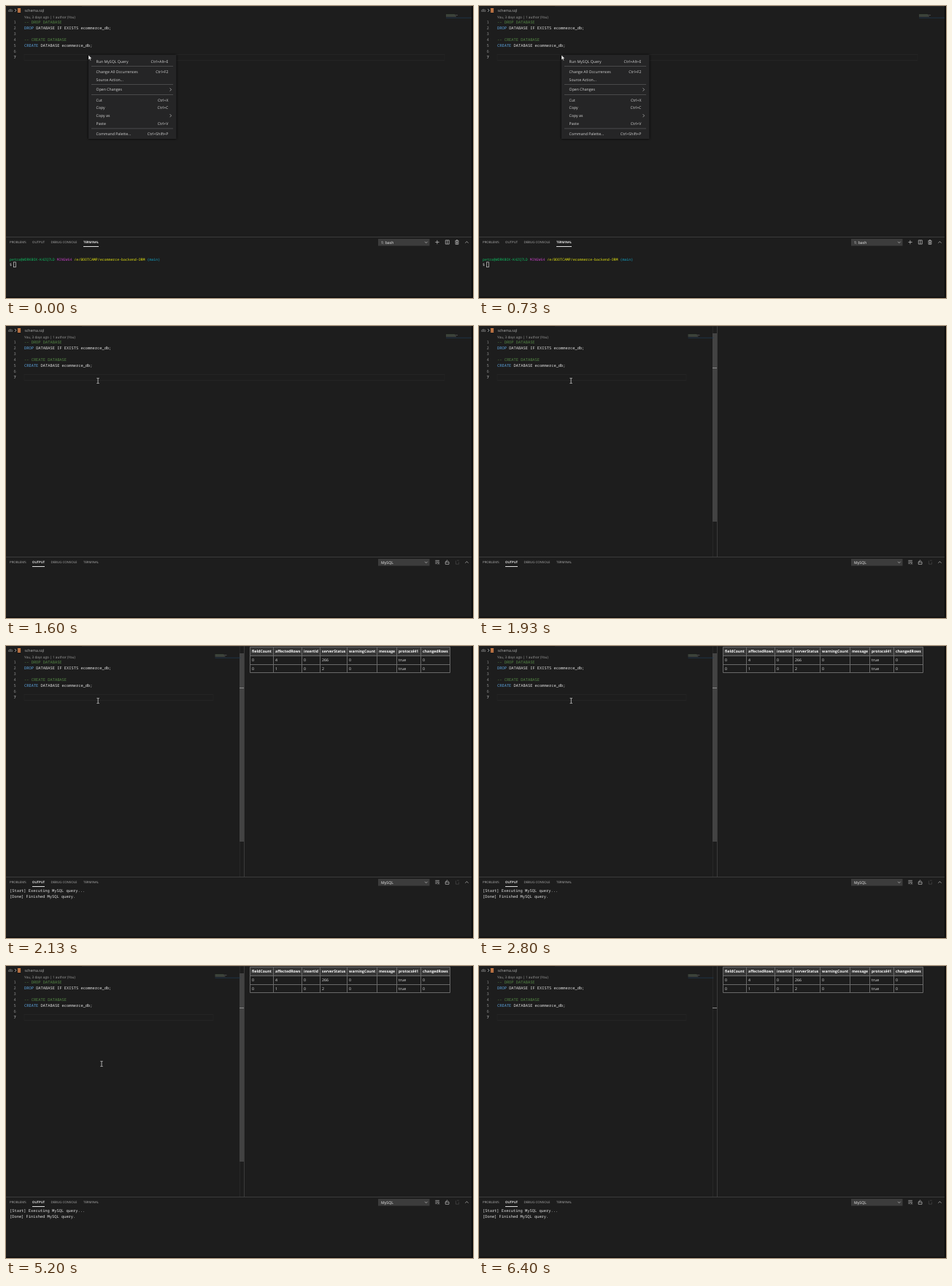
Animation, 640 px wide and 400 px high, one loop 6.86 s. Source, as an HTML page:

```html
<!DOCTYPE html>
<html lang="en">
<head>
<meta charset="utf-8">
<title>Running a schema query</title>
<style>
  html, body { margin: 0; width: 100%; height: 100%; overflow: hidden; background: #1d1d1d; }
  svg { display: block; width: 100%; height: 100%; }
  text { font: 5.2px "Open Sans", "Noto Sans", sans-serif; fill: #d6d6d6; white-space: pre; text-rendering: geometricPrecision; }
  .code { font: 500 5.38px "Noto Sans Mono", "DejaVu Sans Mono", monospace; fill: #e2e2e2; }
  .term { font-size: 4.91px; }
  .tab { font-size: 4.38px; fill: #aaa; }
  .on { fill: #f4f4f4; }
  .line { fill: none; stroke: #c5c5c5; stroke-width: .7; }
</style>
</head>
<body>
<svg id="stage" viewBox="0 0 640 400"></svg>
<script>
const LOOP = 6860;
const BLUE = '#5fa8e4', GREEN = '#558a45';

const rect = (x, y, w, h, fill, more = '') =>
  `<rect x="${x}" y="${y}" width="${w}" height="${h}" fill="${fill}" ${more}/>`;
const text = (x, y, s, cls = '', style = '') =>
  `<text x="${x}" y="${y}" class="${cls}" style="${style}">${s}</text>`;
const path = (d, more = '') => `<path class="line" d="${d}" ${more}/>`;
const span = (s, fill) => `<tspan fill="${fill}">${s}</tspan>`;
const group = (id, ...parts) => `<g id="${id}">${parts.join('')}</g>`;

function editor() {
  const lines = [
    span('-- DROP DATABASE', GREEN),
    span('DROP', BLUE) + ' DATABASE IF EXISTS ecommerce_db;',
    '',
    span('-- CREATE DATABASE', GREEN),
    span('CREATE', BLUE) + ' DATABASE ecommerce_db;',
    '', ''
  ];
  const rows = lines.map((s, i) => {
    const y = 24.4 + i * 8;
    return text(10.6, y, i + 1, 'code', `fill:${i == 6 ? '#d6d6d6' : '#8c8c8c'}`) +
           (s && text(25, y, s, 'code'));
  });
  return text(3, 7.9, 'db', '', 'fill:#a9a9a9') +
    path('M12 4l2 2l-2 2') +
    [3, 5.1, 7.2].map(y => rect(15.8, y, 4.4, 1.7, '#d9824a', 'rx=".6"')).join('') +
    text(25.5, 7.9, 'schema.sql', '', 'font-size:5.1px;fill:#b4b4b4') +
    text(25, 16.6, 'You, 3 days ago | 1 author (You)', '', 'font-size:4.73px;fill:#a0a0a0') +
    rows.join('') +
    rect(25, 66.5, 576, 8, 'none', 'id="current" stroke="#272727" stroke-width=".7"');
}

function minimap() {
  const ticks = [[11, 12, '#3d5335'], [12, 16, '#777'], [13.3, 13, '#3d5335'], [14.3, 14, '#666']];
  return group('minimap',
    ...ticks.map(([y, w, c]) => rect(0, y, w, .7, c, 'opacity=".75"')),
    rect(0, 15.8, 35, .7, '#1f3c58'));
}

function table() {
  const cols = [334.5, 366.5, 405.5, 430.5, 467.5, 508.5, 535.5, 568.5, 608.5];
  const ys = [1.5, 13.5, 25.5, 36.5];
  const cells = [
    ['fieldCount', 'affectedRows', 'insertId', 'serverStatus', 'warningCount', 'message', 'protocol41', 'changedRows'],
    [0, 4, 0, 266, 0, '', 'true', 0],
    [0, 1, 0, 2, 0, '', 'true', 0]
  ];
  const grid = cols.map(x => `M${x} 1.5V36.5`).join('') + ys.map(y => `M334.5 ${y}H608.5`).join('');
  return group('table',
    rect(334.5, 1.5, 274, 12, '#363636'),
    path(grid, 'style="stroke:#686868;stroke-width:1"'),
    ...cells.flatMap((row, r) => row.map((s, c) =>
      text(cols[c] + 2.6, 9.4 + r * 11.9, s, '', r ? 'fill:#e6e6e6' : 'font-weight:700;font-size:5.1px;fill:#fff'))));
}

function panel() {
  const tabs = [[5, 'PROBLEMS'], [36, 'OUTPUT'], [61.5, 'DEBUG CONSOLE'], [106, 'TERMINAL']]
    .map(([x, s]) => text(x, 325.4, s, 'tab')).join('');
  const active = (x, w, s) => text(x, 325.4, s, 'tab on') + rect(x, 329, w, 1, '#dcdcdc');
  const prompt = span('petra@WORKBOX-K4ZQ7LD', '#0dbc60') + ' ' + span('MINGW64', '#bc3fbc') + ' ' +
    span('/e/BOOTCAMP/ecommerce-backend-ORM', '#e5e510') + ' ' + span('(main)', '#11a8cd');
  return rect(0, 316, 638, 1, '#3c3c3c') + tabs +
    rect(510, 319, 70.5, 9.5, '#3c3c3c') +
    path('M574 322.8l1.8 1.8l1.8-1.8M629.4 324.7l2.1-2.1l2.1 2.1') +
    group('terminal',
      active(106, 21, 'TERMINAL'),
      text(514, 325.7, '1: bash', '', 'fill:#f0f0f0'),
      path('M588.3 323.5h5.4M590.9 320.8v5.4M602.3 320.9h5v5.2h-5zM604.8 321v5'),
      path('M615.5 321.7h5M617 321.5v-.8h2v.8M616.1 322v4.4h3.8v-4.4M617.4 322.8v2.8M618.7 322.8v2.8'),
      text(5, 348.7, prompt, 'code term'),
      text(5, 356.3, '$', 'code term'),
      rect(10.6, 350.9, 3, 6.8, 'none', 'stroke="#ccc" stroke-width=".7"')) +
    group('output',
      active(36, 17, 'OUTPUT'),
      text(514, 325.7, 'MySQL', '', 'fill:#f0f0f0'),
      path('M588.3 321.3h5.6M588.3 323.3h5.6M588.3 325.3h2.6M591.8 324.4l2 2M593.8 324.4l-2 2'),
      path('M602.2 323.2h4.8v3.1h-4.8zM603.2 323.2v-1.2q1.3-2.2 2.6 0'),
      path('M616.4 321.5v4.7h4.2v-3M618 321.2h2.8', 'opacity=".25"')) +
    group('start', text(5, 336.7, '[Start] Executing MySQL query...', 'code')) +
    group('done', text(5, 344.7, '[Done] Finished MySQL query.', 'code'));
}

function menu() {
  const items = [
    [75.8, 'Run MySQL Query', 'Ctrl+Alt+E'],
    [89.8, 'Change All Occurrences', 'Ctrl+F2'],
    [100.6, 'Source Action...'],
    [114.5, 'Open Changes', '>'],
    [128.6, 'Cut', 'Ctrl+X'],
    [139.4, 'Copy', 'Ctrl+C'],
    [150.2, 'Copy as', '>'],
    [160.8, 'Paste', 'Ctrl+V'],
    [175, 'Command Palette...', 'Ctrl+Shift+P']
  ];
  return group('menu',
    rect(113, 67, 120.5, 115, '#252526', 'style="filter:drop-shadow(0 .6px 1.6px #000)"'),
    rect(113, 70.8, 120.5, 10.3, '#094771', 'id="hover"'),
    ...[82.4, 107.4, 121.4, 167.9].map(y => rect(117, y - .35, 112, .7, '#5a5a5b')),
    ...items.map(([y, name, key]) => text(123.6, y + 1.9, name) +
      (key == '>' ? path(`M224.6 ${y - 2}l2 2l-2 2`)
        : key ? text(222.4, y + 1.9, key, '', 'text-anchor:end') : '')));
}

function cursors() {
  const outline = 'fill="#fff" stroke="#111" stroke-width=".45"';
  return group('cursor',
    `<path id="arrow" d="M0 0V6.6L1.5 5.2L2.5 7.5L3.6 7L2.6 4.8H4.6Z" ${outline}/>`,
    `<path id="hand" d="M-.7 .2Q0-.5 .7 .2V2.7L3.5 3.4Q4.2 3.8 4 5L3.4 8H-.3L-2.3 5.2Q-2.3 4.3-.7 5Z" ${outline}/>`,
    `<path id="beam" class="line" d="M-1.6-3.5H-.5L0-3.1L.5-3.5H1.6M0-3.1V3.1M-1.6 3.5H-.5L0 3.1L.5 3.5H1.6" style="stroke:#eee"/>`);
}

const stage = document.getElementById('stage');
stage.innerHTML =
  rect(104, 0, 534, .8, '#2b2b2c') + editor() +
  group('split',
    rect(320, 0, .6, 316, '#303030'),
    group('scrollbar', rect(320, 10, 6, 258, '#434343')),
    rect(320, 57, 6, 1, '#8c8c8c'),
    rect(326, 0, 1, 316, '#3a3a3a')) +
  minimap() + table() + panel() + menu() +
  rect(638, 0, 2, 400, '#0c0c0c') + rect(0, 398.4, 640, 1.6, '#111') +
  cursors();

const $ = id => document.getElementById(id);
const show = (id, on) => $(id).setAttribute('visibility', on ? 'inherit' : 'hidden');
const clamp = v => Math.min(1, Math.max(0, v));
const ease = v => v * v * (3 - 2 * v);

// Pointer path: time, x, y
const track = [
  [800, 113, 67.2], [1070, 126, 75], [3860, 126.4, 75], [4260, 132.2, 81.6],
  [4460, 132.2, 81.6], [5130, 131, 134], [5200, 131, 134], [5430, 600, 314]
];

function pointer(t) {
  let [, x, y] = track[0];
  for (let i = 1; i < track.length; i++) {
    const [t0, x0, y0] = track[i - 1], [t1, x1, y1] = track[i];
    if (t < t0) break;
    const k = ease(clamp((t - t0) / (t1 - t0)));
    x = x0 + (x1 - x0) * k;
    y = y0 + (y1 - y0) * k;
  }
  return [x, y];
}

function draw() {
  const t = performance.now() % LOOP;
  const [x, y] = pointer(t);
  const open = t < 1530, split = t >= 1660, output = t >= 1600;
  const hover = open && y > 70.8;

  show('menu', open);
  show('hover', hover);
  show('split', split);
  show('terminal', !output);
  show('output', output);
  show('start', t >= 2000);
  show('done', t >= 2060);
  show('table', t >= 2060);
  $('scrollbar').setAttribute('opacity', 1 - clamp((t - 5200) / 260));
  $('current').setAttribute('width', split ? 259 : 576);
  $('minimap').setAttribute('transform', `translate(${split ? 286.5 : 603} 0)`);

  $('cursor').setAttribute('transform', `translate(${x} ${y})`);
  show('cursor', t < 5430);
  show('arrow', open && !hover);
  show('hand', hover);
  show('beam', !open);
  requestAnimationFrame(draw);
}
draw();
</script>
</body>
</html>
```
